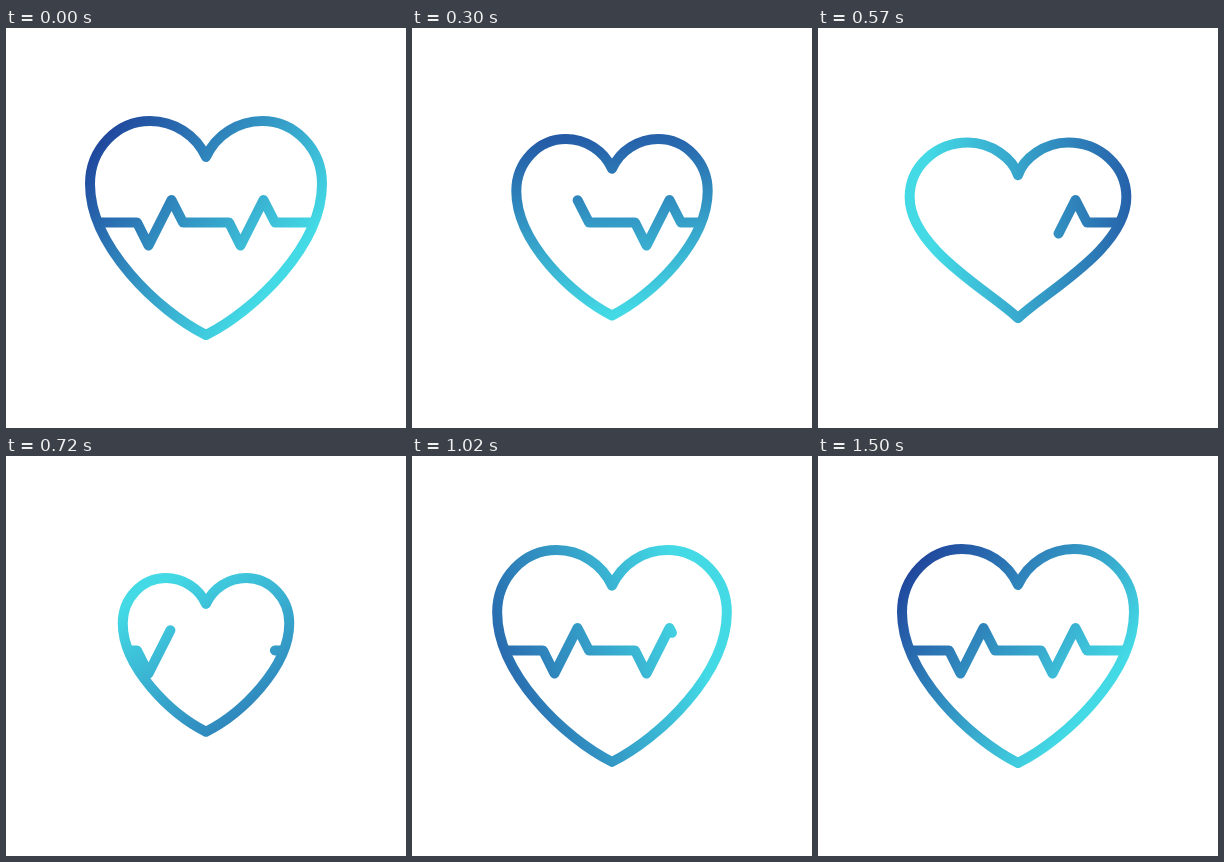
Animation of 400 by 400 pixels, one loop 3710 ms. Source, as an HTML page with a canvas:

```html
<!DOCTYPE html>
<html lang="en">
<head>
<meta charset="utf-8">
<title>Heartbeat</title>
<style>
  html, body { margin: 0; height: 100%; overflow: hidden; background: #fff; }
  canvas { display: block; width: 100vmin; height: 100vmin; }
</style>
</head>
<body>
<canvas id="stage" width="400" height="400"></canvas>
<script>
const ctx = document.getElementById('stage').getContext('2d');
const LOOP = 3710, STEP = 30, ACTIVE = 1350;
const MID_X = 200, MID_Y = 196, BASELINE = 194.5;
const DASH = 400, PULSE_LENGTH = 325;

// Left half of the heart from cleft to tip: start point, then cubic segments
const NORMAL = [[200,129], [190,107], [168,93], [144,93], [111,93], [84,121], [84,156],
  [84,218], [152,283], [200,307]];
const WIDE = [[200,146], [196,128], [170,108], [142,108], [104,108], [72,135], [72,170],
  [72,228], [180,270], [200,302]];

const progress = (t, from, to) => Math.min(1, Math.max(0, (t - from) / (to - from)));
const easeInOut = p => p * p * (3 - 2 * p);
const easeOut = p => 1 - (1 - p) ** 2;
const mix = (a, b, p) => a + (b - a) * p;

const pulse = new Path2D();
pulse.moveTo(95, BASELINE);
for (const x of [131, 223]) {
  pulse.lineTo(x, BASELINE);
  pulse.lineTo(x + 11.5, BASELINE + 23);
  pulse.lineTo(x + 34.5, BASELINE - 22.5);
  pulse.lineTo(x + 46, BASELINE);
}
pulse.lineTo(340, BASELINE);

function heartPath(t) {
  const scale = 1 - .175 * easeInOut(progress(t, 0, 300))
    - .155 * easeInOut(progress(t, 300, 690))
    + .33 * easeOut(progress(t, 690, 1090));
  const widen = easeInOut(progress(t, 300, 480)) - easeInOut(progress(t, 480, 680));
  const left = NORMAL.map(([x, y], i) => [
    mix(mix(MID_X, x, scale), WIDE[i][0], widen),
    mix(mix(MID_Y, y, scale), WIDE[i][1], widen)
  ]);
  const right = left.map(([x, y]) => [2 * MID_X - x, y]).reverse();
  const path = new Path2D();
  path.moveTo(...left[0]);
  for (const half of [left, right])
    for (let i = 1; i < half.length; i += 3)
      path.bezierCurveTo(...half[i], ...half[i + 1], ...half[i + 2]);
  path.closePath();
  return path;
}

// The gradient makes one clockwise turn; its dark end moves away while it points down
function gradient(t) {
  const angle = (-52 + 360 * easeInOut(progress(t, 0, ACTIVE))) * Math.PI / 180;
  const dx = Math.sin(angle), dy = -Math.cos(angle);
  const dark = 175 + 40 * dy, light = 85;
  const paint = ctx.createLinearGradient(200 + dx * dark, 200 + dy * dark,
    200 - dx * light, 200 - dy * light);
  paint.addColorStop(0, '#1e3f99');
  paint.addColorStop(1, '#43d9e5');
  return paint;
}

function strokePulse(offset) {
  ctx.lineDashOffset = offset;
  ctx.stroke(pulse);
}

function draw(t) {
  const heart = heartPath(t);
  const erased = Math.min(DASH, 113 * (t / 300) ** 1.06);
  const drawn = PULSE_LENGTH * easeOut(progress(t, 575, ACTIVE));
  ctx.fillStyle = '#fff';
  ctx.fillRect(0, 0, 400, 400);
  ctx.strokeStyle = gradient(t);
  ctx.lineWidth = 10;
  ctx.lineCap = ctx.lineJoin = 'round';
  ctx.save();
  ctx.clip(heart);
  ctx.setLineDash([DASH, DASH]);
  strokePulse(2 * DASH - erased);
  if (drawn > 0) strokePulse(DASH - drawn);
  ctx.restore();
  ctx.stroke(heart);
}

function frame() {
  const t = performance.now() % LOOP;
  draw(Math.floor(t / STEP) * STEP);
  requestAnimationFrame(frame);
}
frame();
</script>
</body>
</html>
```
